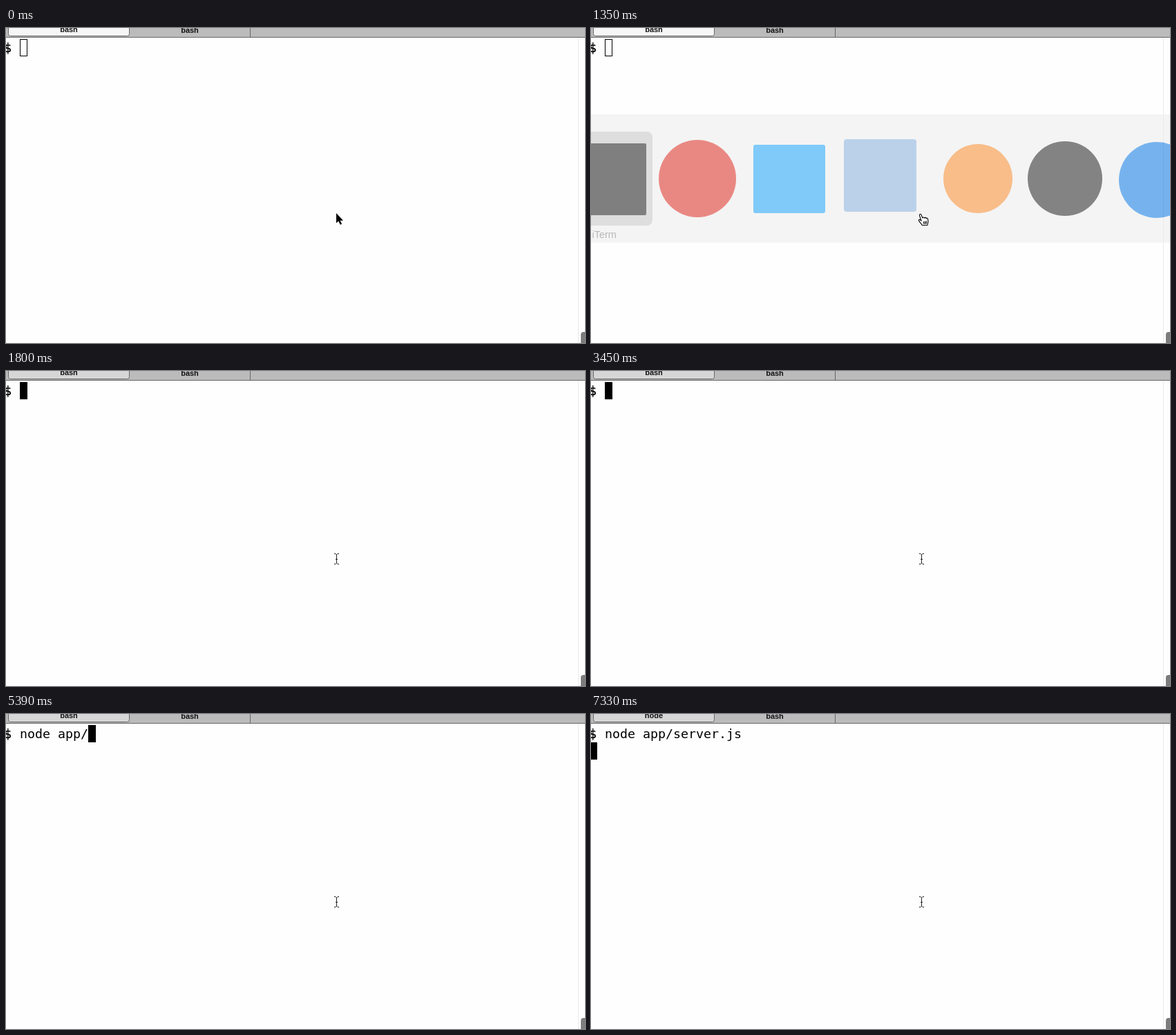
An HTML page that plays this animation: 838x456 px, repeating every 8000 ms.

```html
<!DOCTYPE html>
<html lang="en">
<head>
<meta charset="utf-8">
<title>Terminal</title>
<style>
  html, body { margin: 0; width: 100%; height: 100%; overflow: hidden; background: #fefefe; }
  svg { display: block; width: 838px; height: 456px; }
  .tab { font: bold 11px "Liberation Sans", Arial, sans-serif; fill: #111; text-anchor: middle; }
  .cmd { font: 18.27px "DejaVu Sans Mono", monospace; white-space: pre; }
  .prompt { stroke: #000; stroke-width: 0.4; }
  .label { font: 14.5px "Liberation Sans", Arial, sans-serif; fill: #888; }
</style>
</head>
<body>
<svg viewBox="0 0 838 456">
  <rect width="838" height="456" fill="#fefefe"/>

  <rect x="828" y="14" width="1" height="442" fill="#e9e9e9"/>
  <rect x="832" y="440" width="12" height="30" rx="4" fill="#7c7c7c"/>

  <rect width="838" height="13" fill="#bbb"/>
  <rect y="13" width="838" height="1" fill="#666"/>
  <rect id="tab" x="3.5" y="-6.5" width="175" height="18" rx="3" stroke="#666"/>
  <rect x="353" width="1" height="13" fill="#666"/>
  <text id="title" class="tab" x="91" y="6"></text>
  <text class="tab" x="266" y="7">bash</text>

  <text class="cmd prompt" x="-3" y="35">$</text>
  <text id="cmd" class="cmd" x="20" y="35"></text>
  <rect id="caret" stroke="#000"/>

  <g id="switcher">
    <rect y="125" width="838" height="186" fill="#efefef"/>
    <rect x="-40" y="150" width="129" height="136" rx="8" fill="#cacaca"/>
    <rect x="-24" y="167" width="104" height="104" rx="2" fill="#2b2b2b"/>
    <circle cx="154" cy="218" r="56" fill="#dc3b31"/>
    <rect x="235" y="169" width="104" height="99" rx="3" fill="#2ba8f6"/>
    <rect x="366" y="161" width="105" height="105" rx="4" fill="#8fb4de"/>
    <circle cx="560" cy="218" r="50" fill="#f5923c"/>
    <circle cx="686" cy="218" r="54" fill="#333"/>
    <circle cx="819" cy="220" r="55" fill="#1c82e4"/>
    <text class="label" x="1.5" y="304">iTerm</text>
  </g>

  <path id="arrow" d="M478 268v14.5l3.2-3 2.6 5.2 2.3-1-2.5-5h4.4z" stroke="#fff" stroke-width="1.6" paint-order="stroke"/>
  <g id="hand" stroke="#000" stroke-width="1.1" stroke-linejoin="round" stroke-linecap="round">
    <path fill="#fff" d="M479.2 285.5c-.4-1.7-4-4.6-4.8-6.8-.4-1.5 1.5-1.8 2.7-.5l1 1-2.6-7.6c-.6-2.2 1.8-2.9 2.6-1l1.7 4.4c.3-1.4 2.3-1.3 2.7.1.6-1.1 2.2-.9 2.6.4.9-.8 2.1-.2 2.4 1 .6 2.4.7 4 0 5.8l-.6 3.2z"/>
    <path fill="none" d="M481.4 280.2l.4 3.2M483.5 280l.2 3.4M485.4 279.8v3.2"/>
  </g>
  <path id="beam" fill="none" stroke="#222" d="M475 264.5h2l1.5 1.5 1.5-1.5h2M478.5 266v12M475 279.5h2l1.5-1.5 1.5 1.5h2M477 272.5h3"/>
</svg>
<script>
const LOOP = 8000, CELL = 11, ROW = 25;
const COMMAND = "node app/server.js ";
const ENTER = 6880;

// [start ms, value]
const typed = [[0, 0], [2100, 1], [3450, 0], [4040, 1], [4190, 2], [4340, 3], [4490, 5],
  [4940, 7], [5090, 8], [5390, 9], [5840, 10], [6140, COMMAND.length]];
const fade = [[0, 0], [750, 1], [1350, 0.6], [1500, 0.2], [1650, 0]];
const pointer = [[0, "arrow"], [750, "hand"], [1800, "beam"]];

const $ = id => document.getElementById(id);
const at = (steps, t) => steps.findLast(([start]) => start <= t)[1];

function set(id, attrs) {
  for (const name in attrs) $(id).setAttribute(name, attrs[name]);
}

function drawCaret(column, row, solid) {
  const inset = solid ? 0 : 0.5;
  set("caret", {
    x: column * CELL - 2 + inset,
    y: 16 + row * ROW + inset,
    width: CELL - 2 * inset,
    height: ROW - 2 * inset,
    fill: solid ? "#000" : "none",
    "stroke-width": solid ? 0 : 1
  });
}

function render(t) {
  const active = t >= 1500, entered = t >= ENTER;
  const count = at(typed, t);

  $("cmd").textContent = COMMAND.slice(0, count);
  drawCaret(entered ? 0 : count + 2, entered ? 1 : 0, active);

  set("tab", { fill: active ? "#d6d6d6" : "#f6f6f6" });
  $("title").textContent = t >= 7330 ? "node" : "bash";

  set("switcher", { opacity: at(fade, t) });
  for (const [, id] of pointer) {
    set(id, { visibility: id === at(pointer, t) ? "visible" : "hidden" });
  }
}

const origin = performance.now();
function tick() {
  render((performance.now() - origin) % LOOP);
  requestAnimationFrame(tick);
}
tick();
</script>
</body>
</html>
```
